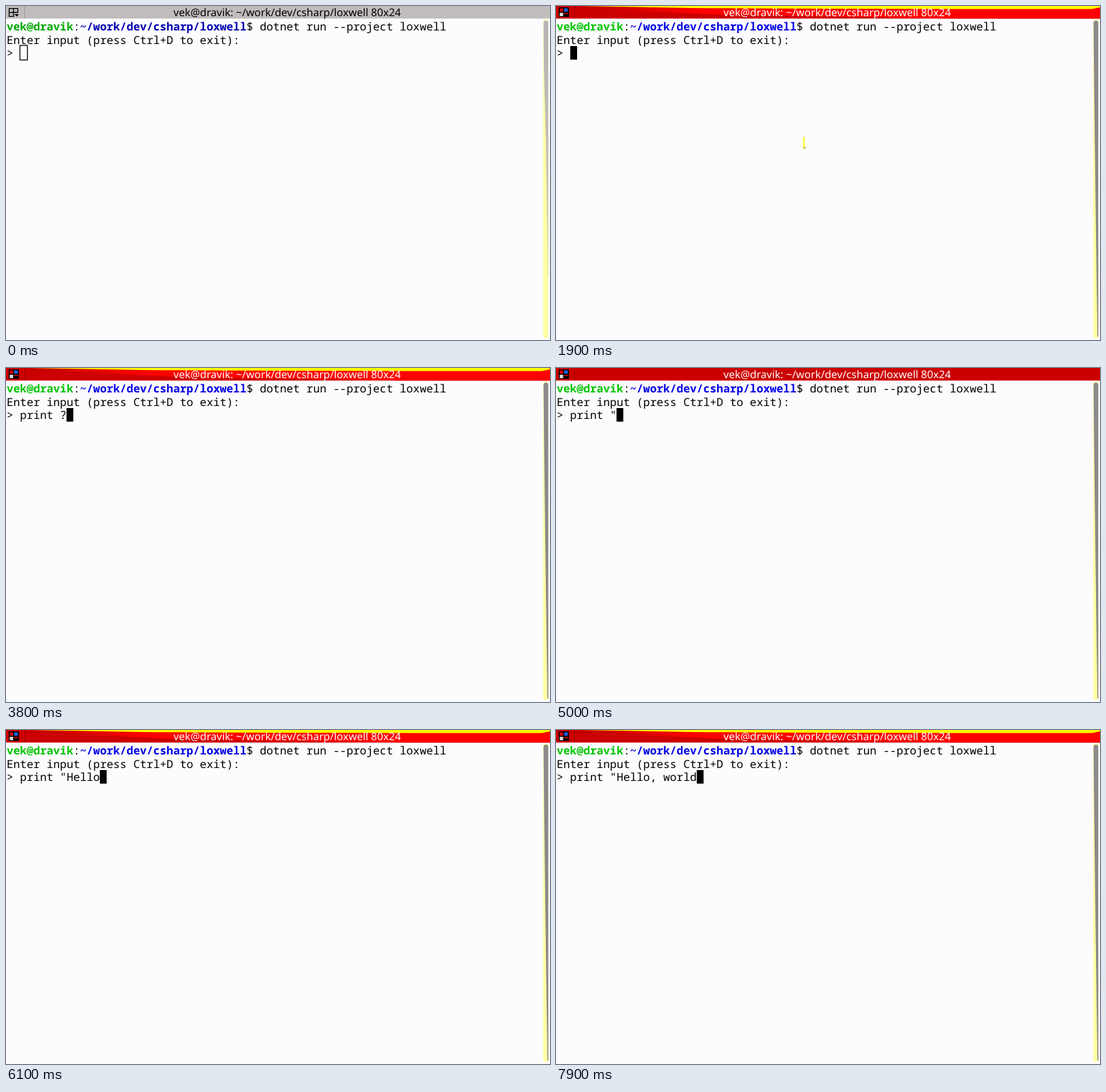
Write an HTML page that moves like this. It is 800x492 px and loops after 8 s.

```html
<!DOCTYPE html>
<html lang="en">
<head>
<meta charset="utf-8">
<title>Terminal session</title>
<style>
  html, body { margin: 0; width: 100%; height: 100%; overflow: hidden; background: #fcfcff; }
  svg { display: block; width: 800px; height: 492px; }
  text { white-space: pre; text-rendering: geometricPrecision; }
  .mono { font: 500 16.333px "Noto Sans Mono", "DejaVu Sans Mono", monospace; }
  .bold { font-weight: 700; }
  #title { font: 15.6px "Noto Sans", "Open Sans", sans-serif; text-anchor: middle; }
</style>
</head>
<body>
<svg viewBox="0 0 800 492">
  <defs>
    <linearGradient id="redFade" gradientUnits="userSpaceOnUse" x1="27" y1="0" x2="210" y2="0">
      <stop offset="0" stop-color="#b80000"/><stop offset="1" stop-color="#ff0000"/>
    </linearGradient>
    <linearGradient id="paleFade" gradientUnits="userSpaceOnUse" x1="27" y1="0" x2="300" y2="0">
      <stop offset="0" stop-color="#fcf8e0"/><stop offset="1" stop-color="#ffffb0"/>
    </linearGradient>
    <linearGradient id="lilacFade" gradientUnits="userSpaceOnUse" x1="27" y1="0" x2="250" y2="0">
      <stop offset="0" stop-color="#b4b0c0"/><stop offset="1" stop-color="#c8c4e0"/>
    </linearGradient>
    <linearGradient id="thumbFade" x1="0" y1="0" x2="0" y2="1">
      <stop offset="0" stop-color="#b8b4b8"/><stop offset=".6" stop-color="#c4c0b8"/>
      <stop offset="1" stop-color="#e0dca8"/>
    </linearGradient>
  </defs>

  <rect width="800" height="492" fill="#fcfcff"/>
  <rect id="bar" width="800" height="18.5"/>

  <g id="paleSheen">
    <path d="M27 0H800V18.5H27Z" fill="url(#lilacFade)"/>
    <path d="M27 1.5L250 13Q420 17 585 17.5H800V0H27Z" fill="url(#paleFade)"/>
  </g>
  <g id="redSheen">
    <path d="M27 3L250 13Q420 16 585 18.5H800V2H27Z" fill="url(#redFade)"/>
    <path d="M36 0H800V2L788 4.5Q400 4.5 200 3Z" fill="#ffff00"/>
  </g>

  <path d="M27.5 0V18.5" stroke="#000" opacity=".18"/>
  <text id="title" x="413.5" y="15">vek@dravik: ~/work/dev/csharp/loxwell 80x24</text>
  <path id="titleVeil" d="M246 3H582V9.5H330L246 7Z" fill="#ffffa4" opacity=".85"/>

  <g id="plainIcon" fill="none" stroke="#000" stroke-width="1.3">
    <path d="M4.6 3.6H17.4V10M4.6 3.6V15.4H12M11 3.6V15.4M4.6 9.5H17.4"/>
    <path d="M12.5 12H19L15.8 15.5Z" fill="#000" stroke="none"/>
  </g>
  <g id="colorIcon">
    <rect x="4" y="2" width="15" height="14" fill="#000"/>
    <rect x="5.5" y="3.5" width="5" height="5" fill="#e00000"/>
    <rect x="12" y="3.5" width="5.5" height="5" fill="#2060d8"/>
    <rect x="5.5" y="10" width="5" height="5" fill="#dcdcdc"/>
    <path d="M11.5 10H18V12H11.5Z" fill="#b00000"/>
  </g>

  <rect x="790" y="20" width="7.5" height="469" rx="3" fill="#ffffa4"/>
  <path id="paleThumb" d="M790.5 25Q790.5 21.5 794 21.5T797.5 25V400H796.8L794 200L791 90Z" fill="url(#thumbFade)"/>
  <path id="darkThumb" d="M790.5 25Q790.5 21.5 794 21.5T797.5 25V487H796.2L794 330L791.5 130Z" fill="#8c888c"/>

  <text class="mono" x="1" y="35.7"><tspan class="bold" id="user">vek@dravik</tspan>:<tspan class="bold" id="path">~/work/dev/csharp/loxwell</tspan>$ dotnet run --project loxwell</text>
  <text class="mono" x="1" y="55.5">Enter input (press Ctrl+D to exit):</text>
  <text class="mono" id="input" x="1" y="75.2"></text>
  <rect id="cursor"/>
  <g id="pointer">
    <path d="M364.5 193V209" stroke="#ffff00" stroke-width="2"/>
    <path d="M363 193.5H366M363 210.5H367" stroke="#ece830"/>
    <path d="M365 208.5H367" stroke="#333"/>
  </g>
</svg>
<script>
const LOOP = 8000, CELL = 9.8, FOCUS = 1200;
const el = id => document.getElementById(id);
const within = (t, from, to) => t >= from && t < to;
const show = (id, on) => el(id).setAttribute("display", on ? "inline" : "none");

function set(id, attrs) {
  for (const [name, value] of Object.entries(attrs)) el(id).setAttribute(name, value);
}

// Each entry is a time and the key pressed; "<" deletes.
const keys = [
  [2800, "p"], [2900, "r"], [3000, "i"], [3100, "n"], [3200, "t"], [3400, " "], [3700, "?"],
  [4500, "<"], [4900, '"'],
  [5500, "H"], [5700, "e"], [5800, "l"], [5900, "l"], [6000, "o"],
  [6500, ","], [6700, " "], [7000, "w"], [7200, "o"], [7400, "r"], [7500, "l"], [7700, "d"]
];

function typedAt(t) {
  return keys.filter(([at]) => at <= t)
    .reduce((line, [, key]) => key === "<" ? line.slice(0, -1) : line + key, "> ");
}

function draw(t) {
  const focused = t >= FOCUS;
  const flat = t < 400 || within(t, 4800, 5500);
  const line = typedAt(t);
  const x = Math.round(1 + line.length * CELL);

  set("bar", { fill: focused ? "#cc0000" : "#c0bcbc" });
  set("title", { fill: focused ? "#fff" : "#000" });
  show("paleSheen", !focused && !flat);
  show("titleVeil", !focused && !flat);
  show("redSheen", focused && !flat);
  show("plainIcon", !focused);
  show("colorIcon", focused);
  show("paleThumb", !focused);
  show("darkThumb", focused);
  set("user", { fill: focused ? "#00c400" : "#00a800" });
  set("path", { fill: focused ? "#0000e4" : "#0000b0" });

  el("input").textContent = line;
  set("cursor", focused
    ? { x, y: 59, width: 10, height: 20, fill: "#000", stroke: "none" }
    : { x: x - .5, y: 58, width: 11, height: 21.5, fill: "none", stroke: "#000", "stroke-width": 1.3 });
  show("pointer", within(t, 1500, 2300));
}

const start = performance.now();
function tick() {
  draw((performance.now() - start) % LOOP);
  requestAnimationFrame(tick);
}
tick();
</script>
</body>
</html>
```
